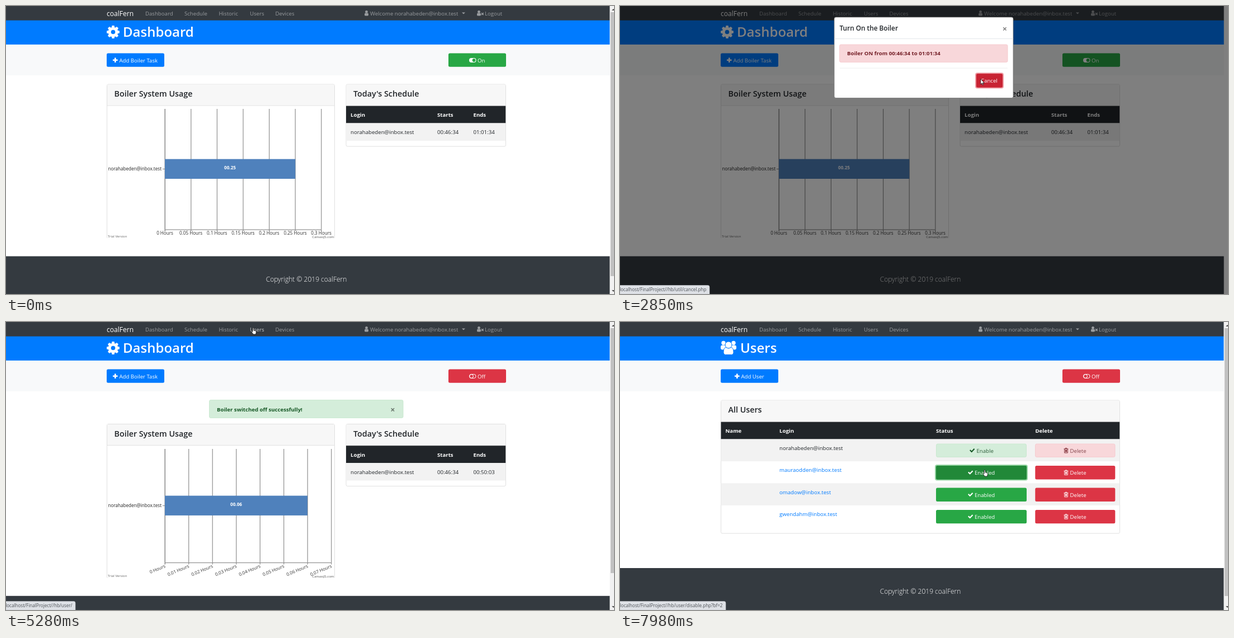
Write an HTML page that moves like this. It is 1087x515 px and loops after 8000 ms.

```html
<!DOCTYPE html>
<html lang="en">
<head>
<meta charset="utf-8">
<title>Boiler control panel</title>
<style>
  html, body { margin: 0; width: 100%; height: 100%; overflow: hidden; background: #fff; }
  svg { display: block; width: 1087px; height: 515px; font-family: "Open Sans", "Noto Sans", sans-serif; }
</style>
</head>
<body>
<svg id="stage" viewBox="0 0 1087 515"></svg>
<script>
const LOOP = 8000;
const BRAND = 'coalFern';
const OWNER = 'norahabeden@inbox.test';
const MEMBERS = ['mauraodden@inbox.test', 'omadow@inbox.test', 'gwendahm@inbox.test'];
const BODY = 9.65, SMALL = 8.1, PAGE_WIDTH = 1079.6;
const GREEN = '#28a745', RED = '#dc3545', BLUE = '#007bff', DARK = '#343a40', INK = '#212529';
const HOVER = { [GREEN]: '#218838', [RED]: '#c82333', [BLUE]: '#0069d9' };
const MUTED = '#999c9f';

// Time helpers
const ramp = (t, a, b) => Math.min(1, Math.max(0, (t - a) / (b - a)));
const easeOut = (p, n) => 1 - (1 - p) ** n;
const smooth = p => p * p * (3 - 2 * p);

// Drawing helpers, each returning SVG markup
const rect = (x, y, w, h, fill, extra = '') =>
  `<rect x="${x}" y="${y}" width="${w}" height="${h}" fill="${fill}" ${extra}/>`;
const path = (d, fill, extra = '') => `<path d="${d}" fill="${fill}" ${extra}/>`;
const circle = (x, y, r, fill, extra = '') => `<circle cx="${x}" cy="${y}" r="${r}" fill="${fill}" ${extra}/>`;
const text = (x, y, str, fill = INK, size = BODY, extra = '') =>
  `<text x="${x}" y="${y}" fill="${fill}" font-size="${size}" ${extra}>${str}</text>`;
const bold = (x, y, str, fill) => text(x, y, str, fill, BODY, 'font-weight="700"');
const heading = (x, y, str, fill, size) => text(x, y, str, fill, size, 'font-weight="600"');
const group = (x, y, content, extra = '') => `<g transform="translate(${x} ${y})" ${extra}>${content}</g>`;
const box = (x, y, w, h, fill, border, r = 2.5) =>
  rect(x + .5, y + .5, w - 1, h - 1, fill, `rx="${r}" stroke="${border}" stroke-width=".8"`);
const END = 'text-anchor="end"', MID = 'text-anchor="middle"';

const icons = {
  plus: c => path('M3 0h2.6v3H8.6v2.6H5.6v3H3v-3H0V3h3z', c),
  user: c => circle(3.5, 2.5, 2.4, c) +
    path('M0 8V7Q0 4.7 1.6 4.5Q3.5 6 5.4 4.5Q7 4.7 7 7V8Q7 9.4 5.7 9.4H1.3Q0 9.4 0 8Z', c),
  logout: c => icons.user(c) + path('M8 4.2l3.8 3.8M11.8 4.2L8 8', 'none', `stroke="${c}" stroke-width="1.5"`),
  check: c => path('M0 4L1.5 2.5L3.7 4.6L7.8 .3L9.3 1.8L3.7 7.6Z', c),
  trash: c => path('M0 2H8M2.6 2V.6H5.4V2M1.2 2V9H6.8V2M2.9 3.6V7.4M4 3.6V7.4M5.1 3.6V7.4', 'none',
    `stroke="${c}" stroke-width=".9"`),
  on: () => rect(0, 0, 12.6, 8, '#fff', 'rx="4"') + circle(8.6, 4, 2.9, 'currentColor'),
  off: () => rect(.5, .5, 11.6, 7, 'none', 'rx="3.5" stroke="#fff"') + circle(4, 4, 3.4, 'none', 'stroke="#fff"'),
  gear: c => {
    let teeth = '';
    for (let i = 0; i < 8; i++)
      teeth += path('M-2.8 -8L-2 -11.4H2L2.8 -8Z', c, `transform="rotate(${i * 45})"`);
    return teeth + circle(0, 0, 8.8, c) + circle(0, 0, 3.8, BLUE);
  },
  people: c => [5, 23].map(x => circle(x, 4, 3.7, c) +
      rect(x - 5, 8, 10, 8, c, 'rx="3"')).join('') +
    path('M8.5 25Q5 25 5 21Q5 12 9.5 12Q14 15 18.5 12Q23 12 23 21Q23 25 19.5 25Z', c, `stroke="${BLUE}"`) +
    circle(14, 7.4, 6, c, `stroke="${BLUE}"`),
};
const icon = (name, x, y, color = '#fff') => group(x, y, icons[name](color));

function button(x, y, w, color, hover = 0, ring = 0) {
  const height = 24.4;
  const halo = ring ? rect(x - 2, y - 2, w + 4, height + 4, color, `rx="4" opacity="${ring * .5}"`) : '';
  return halo + rect(x, y, w, height, color, 'rx="2.5"') +
    (hover ? rect(x, y, w, height, HOVER[color], `rx="2.5" opacity="${hover}"`) : '');
}

function statusBar(width, url, opacity) {
  return opacity > 0 ? `<g opacity="${opacity}">` +
    path(`M0 499.5H${width - 3}Q${width} 499.5 ${width} 502.5V515H0Z`, '#dee1e6', 'stroke="#c4c7cc" stroke-width=".6"') +
    text(width - 5.5, 510, url, '#4d5156', SMALL, END) + '</g>' : '';
}

function scrollbar(thumbEnd) {
  return rect(PAGE_WIDTH, 0, 8, 515, '#f1f1f1') + rect(1081, 11, 6, thumbEnd - 11, '#c1c1c1') +
    path('M1083 8L1086 5L1089 8Z', '#505050') + path('M1083 508L1086 511L1089 508Z', '#505050');
}

function frame({ title, add, addX, boilerOn, hover, ring, footerY, thumbEnd, usersHover }) {
  const links = [['Dashboard', 249], ['Schedule', 319], ['Historic', 380.5], ['Users', 436], ['Devices', 481.5]];
  const switchColor = boilerOn ? GREEN : RED;
  return rect(0, 0, 1087, 515, '#fff') + rect(0, 0, PAGE_WIDTH, 26, DARK) +
    text(180, 17.5, BRAND, '#fff', 12.1) +
    links.map(([s, x]) => text(x, 17, s, s === 'Users' && usersHover ? '#ccced0' : MUTED)).join('') +
    icon('user', 641, 8, MUTED) + text(651, 17, 'Welcome ' + OWNER, MUTED) +
    path('M815 11.5H821L818 14.6Z', MUTED) +
    icon('logout', 842, 8, MUTED) + text(856, 17, 'Logout', MUTED) +
    rect(0, 68.5, PAGE_WIDTH, 55.5, '#f8f9fa') + rect(0, 25.7, PAGE_WIDTH, 43.2, BLUE) +
    (title === 'Users' ? icon('people', 180, 33.5) : icon('gear', 191.5, 46.5)) +
    heading(title === 'Users' ? 215 : 209, 55, title, '#fff', 24) +
    button(180, 84.4, 103, BLUE) + icon('plus', addX, 92.5) + text(addX + 11.4, 100.5, add, '#fff') +
    button(791, 84.4, 103, switchColor, hover, ring) +
    `<g color="${switchColor}">${icon(boilerOn ? 'on' : 'off', 828, 93)}</g>` +
    text(843, 100.5, boilerOn ? 'On' : 'Off', '#fff') +
    rect(0, footerY, PAGE_WIDTH, 515 - footerY, DARK) +
    text(537, footerY + 45.5, `Copyright © 2019 ${BRAND}`, '#fff', 12, MID + ' font-weight="300"') +
    (thumbEnd ? scrollbar(thumbEnd) : '');
}

function card(x, y, w, h, title) {
  return box(x, y, w, h, '#fff', '#d9d9d9') + rect(x + 1, y + 1, w - 2, 37.5, '#f7f7f7') +
    rect(x + 1, y + 38.2, w - 2, .8, '#dcdcdc') +
    heading(x + 13.5, y + 22.5, title, INK, 14.3);
}

function schedule(y, ends) {
  const cells = (dy, values, draw) => values.map((v, i) => draw([616, 771, 835.5][i], y + dy, v)).join('');
  return card(607.5, y, 286.5, 112, "Today's Schedule") +
    rect(608, y + 39.2, 285.2, 30.8, INK) + rect(608, y + 70, 285.2, 31.5, '#f2f2f2') +
    cells(58.5, ['Login', 'Starts', 'Ends'], (x, ty, v) => bold(x, ty, v, '#fff')) +
    cells(89.5, [OWNER, '00:46:34', ends], (x, ty, v) => text(x, ty, v));
}

function chart(y, { step, labels, slanted, top, bottom, barY, barWidth, value, valueX, valueAlpha }) {
  let out = card(180, y, 408, 277, 'Boiler System Usage') + rect(179, y + 275.5, 410, 3, '#fff');
  labels.forEach((n, i) => {
    const x = 284 + i * step, label = n + ' Hours';
    out += rect(x - .4, top, 1.2, bottom - top + 3, i ? '#909090' : '#6c6c6c');
    out += slanted
      ? group(x + 1.5, bottom + 8, text(0, 0, label, '#333', SMALL, END + ' transform="rotate(-23)"'))
      : text(x, bottom + 8.7, label, '#333', SMALL, MID);
  });
  out += rect(284, bottom - .6, step * (labels.length - 1), 1.2, '#909090') +
    rect(280, barY + 17.3, 4, .9, '#777') +
    text(278, barY + 20.3, OWNER, '#222', SMALL, END);
  if (barWidth > 0) out += rect(284, barY, barWidth, 35.3, '#4f81bc');
  return out + text(valueX, barY + 18.7, value, '#fff', SMALL, `${MID} font-weight="700" opacity="${valueAlpha}"`) +
    text(182, y + 274, 'Trial Version', '#666', 6) + text(586.5, y + 275, 'CanvasJS.com', '#555', 6.1, END);
}

function dashboardOn(t) {
  const modal = t >= 1600;
  return frame({
      title: 'Dashboard', add: 'Add Boiler Task', addX: 191, boilerOn: true, footerY: 447.5,
      hover: ramp(t, 1200, 1350) * (1 - ramp(t, 1650, 1800)),
      ring: ramp(t, 1600, 1700) * (1 - ramp(t, 2670, 2800)),
      thumbEnd: modal ? 0 : 483,
    }) +
    chart(139.5, {
      step: 46.6, labels: [0, 0.05, 0.1, 0.15, 0.2, 0.25, 0.3], top: 184, bottom: 400,
      barY: 273.7, barWidth: 233.3, value: '00.25', valueX: 400.5, valueAlpha: 1,
    }) +
    schedule(139.5, '01:01:34') + (modal ? boilerModal(t) : '');
}

function boilerModal(t) {
  const slide = -32 * (1 - easeOut(ramp(t, 1640, 1840), 2));
  return rect(0, 0, 1087, 515, '#000', `opacity="${.5 * ramp(t, 1600, 1710)}"`) +
    group(0, slide,
      box(382.5, 19.5, 321, 145.5, '#fff', '#777', 3) +
      heading(392.5, 44, 'Turn On the Boiler', INK, 11.8) +
      text(688, 46, '×', '#808080', 14.5, MID + ' font-weight="700"') +
      rect(383, 58, 320, .8, '#dee2e6') +
      box(392, 68.5, 301.5, 32.5, '#f8d7da', '#f5c6cb') +
      bold(406, 88, 'Boiler ON from 00:46:34 to 01:01:34', '#721c24') +
      rect(393, 110.7, 300, .7, '#e6e6e6') +
      button(637, 121.2, 47, RED, ramp(t, 2220, 2330), ramp(t, 2670, 2820)) +
      text(645, 137, 'Cancel', '#fff'),
      `opacity="${ramp(t, 1640, 1740)}"`) +
    statusBar(160, 'localhost/FinalProject//hb/util/cancel.php', ramp(t, 2400, 2540));
}

function dashboardOff(t) {
  return frame({
      title: 'Dashboard', add: 'Add Boiler Task', addX: 191, footerY: 489.8, thumbEnd: 449, usersHover: t > 4900,
    }) +
    box(363, 139, 347.5, 33, '#d4edda', '#c3e6cb') +
    bold(377, 159.5, 'Boiler switched off successfully!', '#155724') +
    text(691.3, 162, '×', '#6a776d', 14.5, MID + ' font-weight="700"') +
    chart(182, {
      step: 42.5, labels: [0, 0.01, 0.02, 0.03, 0.04, 0.05, 0.06, 0.07], slanted: true, top: 227, bottom: 430.5,
      barY: 310.6, barWidth: 255 * easeOut(ramp(t, 3080, 4180), 4),
      value: '00.06', valueX: 411.5, valueAlpha: ramp(t, 3980, 4540),
    }) +
    schedule(182, '00:50:03') +
    statusBar(160, 'localhost/FinalProject//hb/util/cancel.php', 1 - ramp(t, 3480, 3600)) +
    statusBar(124, 'localhost/FinalProject//hb/user/', ramp(t, 5150, 5280));
}

function usersPage(t) {
  const columns = [['Name', 188.5], ['Login', 285], ['Status', 565], ['Delete', 742.5]];
  let out = frame({ title: 'Users', add: 'Add User', addX: 205, footerY: 440, thumbEnd: 490 }) +
    card(180, 139.5, 714, 239, 'All Users') + rect(180.5, 178.7, 712.7, 30.8, INK) +
    columns.map(([s, x]) => bold(x, 198, s, '#fff')).join('');
  [OWNER, ...MEMBERS].forEach((login, i) => {
    const y = 209.5 + i * 39.4, own = i === 0;
    if (i % 2 === 0) out += rect(180.5, y, 712.7, 39.6, '#f2f2f2');
    out += text(285, y + 19.5, login, own ? INK : BLUE);
    out += own
      ? box(565, y + 8, 162, 24.5, '#d4edda', '#c3e6cb') + box(742, y + 8, 143.5, 24.5, '#f8d7da', '#f5c6cb')
      : button(565, y + 8.2, 162, GREEN, i === 1 ? ramp(t, 6600, 6750) : 0, i === 1 ? ramp(t, 7940, 7980) : 0) +
        button(742.3, y + 8.2, 143, RED);
    out += icon('check', own ? 625 : 622, y + 16.3, own ? '#155724' : '#fff') +
      text(own ? 637.5 : 634, y + 24.3, own ? 'Enable' : 'Enabled', own ? '#2b5a38' : '#fff') +
      icon('trash', 793.5, y + 15.5, own ? '#721c24' : '#fff') +
      text(804.5, y + 24.3, 'Delete', own ? '#83434a' : '#fff');
  });
  return out + statusBar(124, 'localhost/FinalProject//hb/user/', 1 - ramp(t, 6080, 6200)) +
    statusBar(189, 'localhost/FinalProject//hb/user/disable.php?bf=2', ramp(t, 6850, 6980));
}

// Pointer stops: time, x, y
const POINTER = [
  [210, 1036, 478], [990, 852, 124], [1300, 839, 99], [1880, 839, 100], [2300, 644, 128], [2450, 644, 129],
  [3020, 645, 131], [3350, 645, 131], [3800, 738, 110], [4270, 545, 39.5], [4660, 475, 17],
  [5050, 442, 10], [5660, 442, 10], [5740, 442, 13], [5920, 442, 13], [6670, 642, 257], [7300, 652, 264], [LOOP, 652, 264],
];

function pointer(t) {
  if (t < POINTER[0][0]) return '';
  const next = Math.max(1, POINTER.findIndex(stop => stop[0] > t));
  const [t0, x0, y0] = POINTER[next - 1], [t1, x1, y1] = POINTER[next];
  const p = smooth(ramp(t, t0, t1)), x = x0 + (x1 - x0) * p, y = y0 + (y1 - y0) * p;
  if (t >= 5510 && t < 5590) return circle(440.5, 12, 6, 'none', 'stroke="#3aa6e8" stroke-width="2.4"');
  const edge = 'stroke="#111" stroke-width=".8" stroke-linejoin="round"';
  const overLink = (t > 4900 && t < 6050) || t > 6600;
  return overLink
    ? group(x - 3, y, path('M2 1Q3 -.4 4 1V5L7.4 5.8Q8.6 6.3 8.2 9L7.5 12H3.2L.4 8.4Q0 6.8 1.2 7L2 7.6Z', '#fff', edge))
    : group(x, y, path('M0 0V9.4L2.2 7.4L3.6 10.6L5 10L3.6 6.9H6.6Z', '#fff', edge));
}

const stage = document.getElementById('stage');
let shown = '';
function render(now) {
  const t = now % LOOP;
  const page = t < 3020 ? dashboardOn : t < 5740 ? dashboardOff : usersPage;
  const markup = page(t) + pointer(t);
  if (markup !== shown) stage.innerHTML = shown = markup;
}

const start = performance.now();
function tick() {
  render(performance.now() - start);
  requestAnimationFrame(tick);
}
tick();
</script>
</body>
</html>
```
